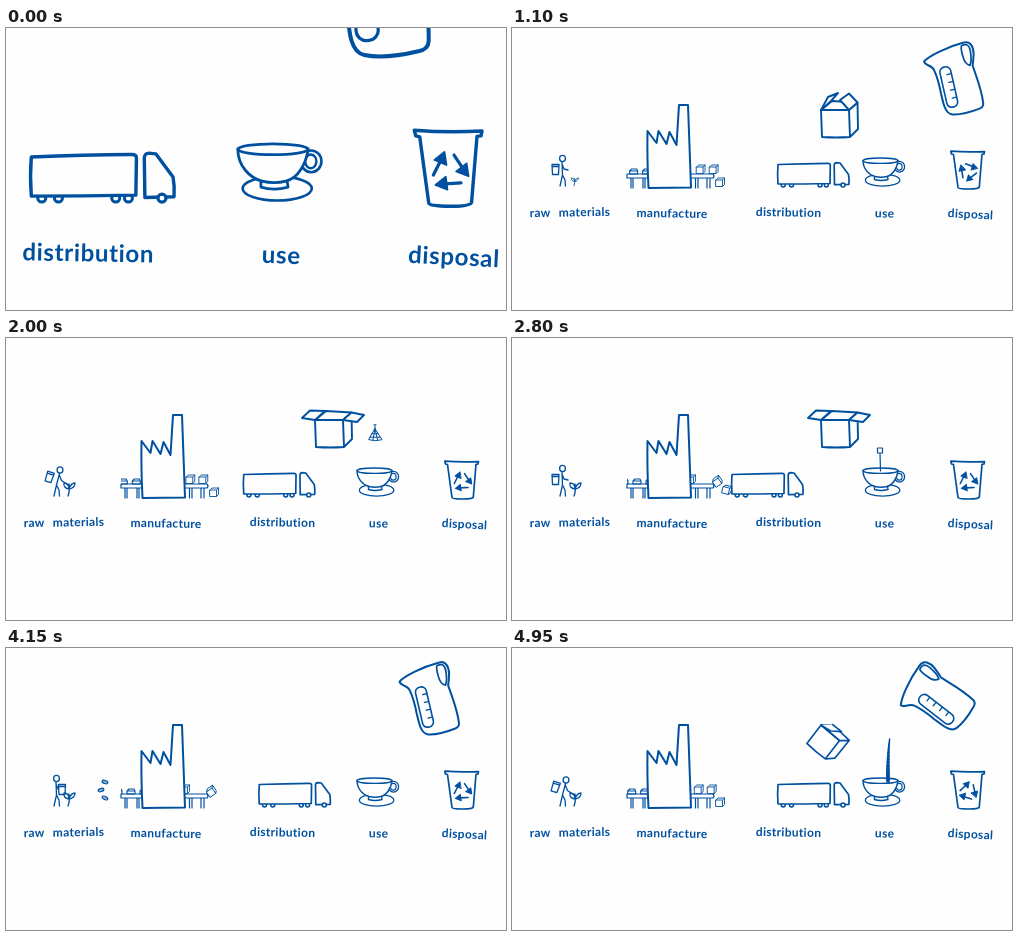
Animation of 500 by 282 pixels, one loop 5 s. Source, as an HTML page with a canvas:

```html
<!DOCTYPE html>
<html lang="en">
<head>
<meta charset="utf-8">
<title>Life cycle of a cup of tea</title>
<style>
html, body { margin: 0; width: 100%; height: 100%; overflow: hidden; background: #fefefe; }
canvas { display: block; width: 500px; height: 282px; }
</style>
</head>
<body>
<canvas id="stage" width="500" height="282"></canvas>
<script>
const ctx = document.getElementById('stage').getContext('2d');
const INK = '#0050a0', PAPER = '#fefefe';
const LOOP = 5000, STEP = 50, CYCLE = 4050, BEAT = CYCLE / 3;

const clamp = v => Math.max(0, Math.min(1, v));
const mix = (a, b, u) => a + (b - a) * u;
const smooth = (t, from, to) => {
  const u = clamp((t - from) / (to - from));
  return u * u * (3 - 2 * u);
};

function draw(d, width = 1.5, fill) {
  const path = typeof d === 'string' ? new Path2D(d) : d;
  if (fill) { ctx.fillStyle = fill; ctx.fill(path); }
  ctx.lineWidth = width;
  ctx.stroke(path);
}

function oval(x, y, rx, ry = rx, width = 1.5, fill, tilt = 0) {
  const path = new Path2D();
  path.ellipse(x, y, rx, ry, tilt, 0, 7);
  draw(path, width, fill);
}

function at(x, y, degrees, paint) {
  ctx.save();
  ctx.translate(x, y);
  ctx.rotate(degrees * Math.PI / 180);
  paint();
  ctx.restore();
}

function labels() {
  ctx.font = 'bold 12px Lato, sans-serif';
  ctx.textAlign = 'center';
  ctx.letterSpacing = '0.3px';
  ctx.wordSpacing = '5px';
  const words = [
    ['raw materials', 58, 188.5, -1], ['manufacture', 160, 189.5, 1], ['distribution', 276.5, 188.5, 1],
    ['use', 372.5, 189.5, 2], ['disposal', 458.3, 190.3, 3]
  ];
  for (const [word, x, y, tilt] of words) {
    at(x, y, tilt, () => {
      ctx.fillStyle = INK;
      ctx.fillText(word, 0, 0);
    });
  }
}

function picker(s, beat) {
  const bend = smooth(beat, 110, 300) - smooth(beat, 930, 1080);
  // The basket comes to the front while it is emptied towards the factory.
  const empty = s > 2000 ? smooth(s, 3750, 3950) : 1 - smooth(s, 130, 300);
  const hipX = 50.5, hipY = 147;
  const neckX = mix(50, 53.5, bend), neckY = mix(134, 135.5, bend);
  const handX = mix(56, 62, bend), handY = mix(142, 147, bend);
  oval(neckX + 0.5, neckY - 3.5, 2.9, 3.1, 1.3);
  draw(`M${neckX} ${neckY}L${hipX} ${hipY}L48 158M${hipX} ${hipY}L53 152 53.5 158
    M${neckX} ${neckY + 2}L${neckX + 2} ${neckY + 7} ${handX} ${handY}`, 1.3);
  at(mix(43.5, 56, empty), mix(141.5, mix(139, 142, empty), bend), bend * 18, () => {
    draw('M-3.5-5H3.5L3 5H-3ZM-3.5-3H3.5', 1.3, PAPER);
  });

  // The plant is cut once the picker stands up, then it grows back.
  const size = beat < 1000 ? 1 : mix(0.6, 1, smooth(beat, 1050, BEAT));
  at(62, 158, 0, () => {
    ctx.scale(size, size);
    draw('M0 0Q2-5 1-12M1-7Q-5-8-4-13Q1-13 1-7Q3-13 7-13Q7-8 1-7', 1.3);
  });
}

function leaves(s) {
  if (s > 300) s -= CYCLE;
  if (s < -200) return;
  const x = mix(66, 121, (s + 200) / 500);
  [[0, 134, 0.3], [-4, 142, -0.3], [0, 150, 0.4]].forEach(([dx, y, tilt]) => {
    oval(x + dx, y, 3, 1.6, 1.2, null, tilt);
    draw(`M${x + dx - 2} ${y}h4`, 0.9);
  });
}

function parcel(x, y, degrees) {
  at(x, y, degrees, () => draw('M-4-2.5H2.5V4H-4ZM-4-2.5L-2-4.5H4.5L2.5-2.5M4.5-4.5V2L2.5 4', 0.9, PAPER));
}

function factory(beat) {
  const shift = 13 * beat / BEAT;
  draw('M115 146H136V150H115ZM119 150V160M121 150V160M131 150V160M133 150V160', 1.2);
  ctx.save();
  ctx.beginPath();
  ctx.rect(115, 130, 22, 17);
  ctx.clip();
  for (let x = 107 + shift; x < 136; x += 13) draw(`M${x} 146v-3l2-2h5l1 2v3ZM${x} 143h8`, 1.1);
  ctx.restore();

  draw('M179 146H201Q203 148 201 150H179M183.5 150V160M186 150V160M195 150V160M198 150V160', 1.2);
  parcel(178 + shift, 141.5, 0);
  if (beat > 150) parcel(191 + shift, 141.5, 0);

  // Each parcel tips over the end of the belt and rests on the ground.
  if (beat < 250) {
    const fall = smooth(beat, 0, 250);
    parcel(mix(204, 208, fall), mix(142, 154.5, fall * fall), -35 * Math.sin(Math.PI * (0.25 + 0.75 * fall)));
  } else parcel(208, 154.5, 0);

  draw(`M135.5 103L144.5 115 146.5 103 154.5 116 157.5 104 164.5 117 167 77H176
    L179 159.5 136.5 160Q135 130 135.5 103Z`, 2, PAPER);
}

function truck(s) {
  const later = s < 1200 ? s + CYCLE : s;
  const x = later > 3300
    ? mix(219, 265, smooth(later, 3300, 4600))
    : mix(265, 219, smooth(later, 1250, 2550));
  if (s > 2650 && s < 2950) parcel(mix(207, 219, smooth(s, 2650, 2900)), 152, 15);
  at(x, 0, 0, () => {
    for (const wheel of [6.2, 14.5, 43, 49.3]) oval(wheel, 157, 2, 1.9, 1.5, PAPER);
    draw('M1 136.5Q27 135.5 51 135.3Q53.3 135.3 53.3 137L53 155.5Q27 156 1 156Q0.2 146 1 136.5Z', 1.7, PAPER);
    draw('M57.2 137Q57.5 134.6 59.5 134.6L63 135 71.5 146.5Q72.4 151 72 156.3L57.5 156.7Z', 1.7, PAPER);
    oval(66, 157, 2, 2, 1.6, PAPER);
  });
}

function carton(s) {
  if (s < 500 || s > 3150) return;
  const rise = smooth(s, 500, 870), settle = smooth(s, 900, 1050);
  const lift = smooth(s, 1000, 1100), spread = smooth(s, 1120, 1320);
  const size = mix(0.1, mix(0.86, 1, settle), rise);
  // Each flap corner passes through shut, raised and spread positions.
  const corner = (shut, raised, open) => shut.map((v, i) =>
    mix(mix(v, raised[i], lift), open[i], spread).toFixed(2)).join(' ');
  const mid = [322, 80], rear = [332, 72.5];
  const l1 = corner(mid, [316, 69], [296, 80]);
  const l2 = corner(rear, [326, 65], [304, 72.5]);
  const r1 = corner(mid, [328, 72], [351, 84]);
  const r2 = corner(rear, [337, 65.5], [358, 77]);
  ctx.save();
  ctx.globalAlpha = 1 - smooth(s, 2950, 3150);
  at(mix(mix(298, 316, rise), 327, settle), mix(mix(142, 93, rise), 91, settle), 40 * (1 - settle), () => {
    ctx.scale(size, size);
    ctx.translate(-327, -91);
    draw('M309 82L310 109Q324 110 338 109L346 101 345.5 74.5 337 82ZM337 82L338 109M309 82L320 73 345.5 74.5', 1.9, PAPER);
    draw(`M309 82L${l1} ${l2} 319 73${lift ? 'Z' : ''}`, 1.9, PAPER);
    if (lift) draw(`M337 82L${r1} ${r2} 345.5 74.5Z`, 1.9, PAPER);
    draw('M309 82L337 82', 1.9);
  });
  ctx.restore();
}

function teaBag(s) {
  if (s < 1700 || s > 3800) return;
  const bag = (x, y) => at(x, y, 0, () => {
    draw('M0-5L7 6Q0 8-6 6ZM-3 0H3M-5 3.5H5M-2 6L0-5 2.5 6', 1, PAPER);
    draw('M0-5V-8M-1-9h2', 1.1);
  });
  if (s < 2200) {
    const u = (s - 1700) / 420;
    const x = mix(328, 369, smooth(s, 1700, 1980));
    const y = 84 - 95 * u + 156 * u * u;
    ctx.save();
    ctx.beginPath();
    ctx.rect(290, 0, 150, 131);
    ctx.clip();
    bag(x, Math.min(y, 145));
    ctx.restore();
  } else if (s < 3400) {
    const y = mix(126, 110, smooth(s, 2200, 2350));
    draw(`M365.5 ${y}h5v5h-5ZM368 ${y + 5}L368.5 133`, 1.2);
  } else {
    const u = (s - 3400) / 400;
    bag(mix(368, 456, u), mix(126, 128, u) - 136 * u * (1 - u));
  }
}

function cup() {
  oval(370.6, 152.2, 17.2, 6, 1.3, PAPER);
  oval(387.5, 138.7, 5.1, 5.4, 1.3, PAPER);
  oval(387.3, 138.7, 2.8, 3.4, 1.2);
  draw('M351 132.5C351 141 357 147 363 148.5Q369 150 375 148.5C381 147 385 140 386 132.5', 1.4, PAPER);
  draw('M362.5 148.5L362.5 151.5Q369 153.5 376 151.5L375.5 148.5', 1.4);
  oval(368.5, 132.7, 17.4, 2.7, 1.4, PAPER);
}

function water(s) {
  if (s < 300 || s > 1020) return;
  const head = smooth(s, 240, 470), tail = clamp((s - 820) / 190);
  const first = tail < 0.01 ? 0 : mix(0.3, 1, tail);
  const point = k => {
    const n = 1 - k;
    return [n * n * 389 + 2 * k * n * 375 + k * k * 376, n * n * 56 + 2 * k * n * 72 + k * k * 133];
  };
  for (let u = first; u < head; u += 0.03) {
    ctx.lineWidth = mix(1.4, 3.8, clamp((u - first) * 3));
    ctx.beginPath();
    ctx.moveTo(...point(u));
    ctx.lineTo(...point(Math.min(u + 0.03, head)));
    ctx.stroke();
  }
}

function kettle(s) {
  const arriving = s > 3800;
  if (!arriving && s > 1400) return;
  let x = mix(421, 424.5, smooth(s, 0, 100));
  if (arriving) x = mix(540, 421, smooth(s, 3840, CYCLE));
  else if (s > 1100) x = mix(443, 545, (s - 1100) / 280);
  else if (s > 900) x = mix(424.5, 443, smooth(s, 900, 1110));
  const pour = arriving ? 0 : smooth(s, 20, 350) - smooth(s, 810, 1190);
  at(x, 52, -5 - 55 * pour, () => {
    draw(`M-26-25C-20-29-2-34 17-34.5C24-35 25.5-28 24-21Q22-14 20.5-10
      C22 4 24 16 22.5 29Q22 33 17 33.5Q0 36-10 33C-17 31-16.5 20-16.5 10
      Q-16-4-18-14C-19-20-26-20-26-25Z`, 2, PAPER);
    draw('M14-32Q22-34 21.5-25Q21-15 18-11Q13-13 13-22Q12.5-29 14-32Z', 1.7);
    const gauge = new Path2D();
    gauge.roundRect(-13, -15, 11, 41, 5);
    draw(gauge, 1.6);
    for (let y = -7; y <= 18; y += 8) draw(`M-2.5 ${y}h-4`, 1.3);
  });
}

function bin(beat) {
  draw('M438.8 123.2Q455 124.5 472.5 123.6L472 126 470 126.3 467.3 159Q467 161 457 161Q446 161 446 159.5L441.5 126.5 439.5 126Z', 1.7, PAPER);
  const turn = 120 * smooth(beat, 760, 1290);
  for (let i = 0; i < 3; i++) {
    at(456.3, 143.5, turn + i * 120, () => {
      draw('M-8 2L-4.5-5', 1.6);
      draw('M-2.5-9.5L-7.5-5.5-1.5-3Z', 0.9, INK);
    });
  }
}

function render(time) {
  const t = Math.floor(time % LOOP / STEP) * STEP;
  const s = t % CYCLE, beat = s % BEAT;
  const zoom = mix(2.01, 1, smooth(t, 0, 300));
  ctx.setTransform(1, 0, 0, 1, 0, 0);
  ctx.fillStyle = PAPER;
  ctx.fillRect(0, 0, 500, 282);
  ctx.setTransform(zoom, 0, 0, zoom, 469 * (1 - zoom), 144 * (1 - zoom));
  ctx.strokeStyle = INK;
  ctx.lineCap = ctx.lineJoin = 'round';
  labels();
  picker(s, beat);
  leaves(s);
  factory(beat);
  truck(s);
  carton(s);
  cup();
  water(s);
  teaBag(s);
  kettle(s);
  bin(beat);
}

const start = performance.now();
function tick() {
  render(performance.now() - start);
  requestAnimationFrame(tick);
}
tick();
</script>
</body>
</html>
```
